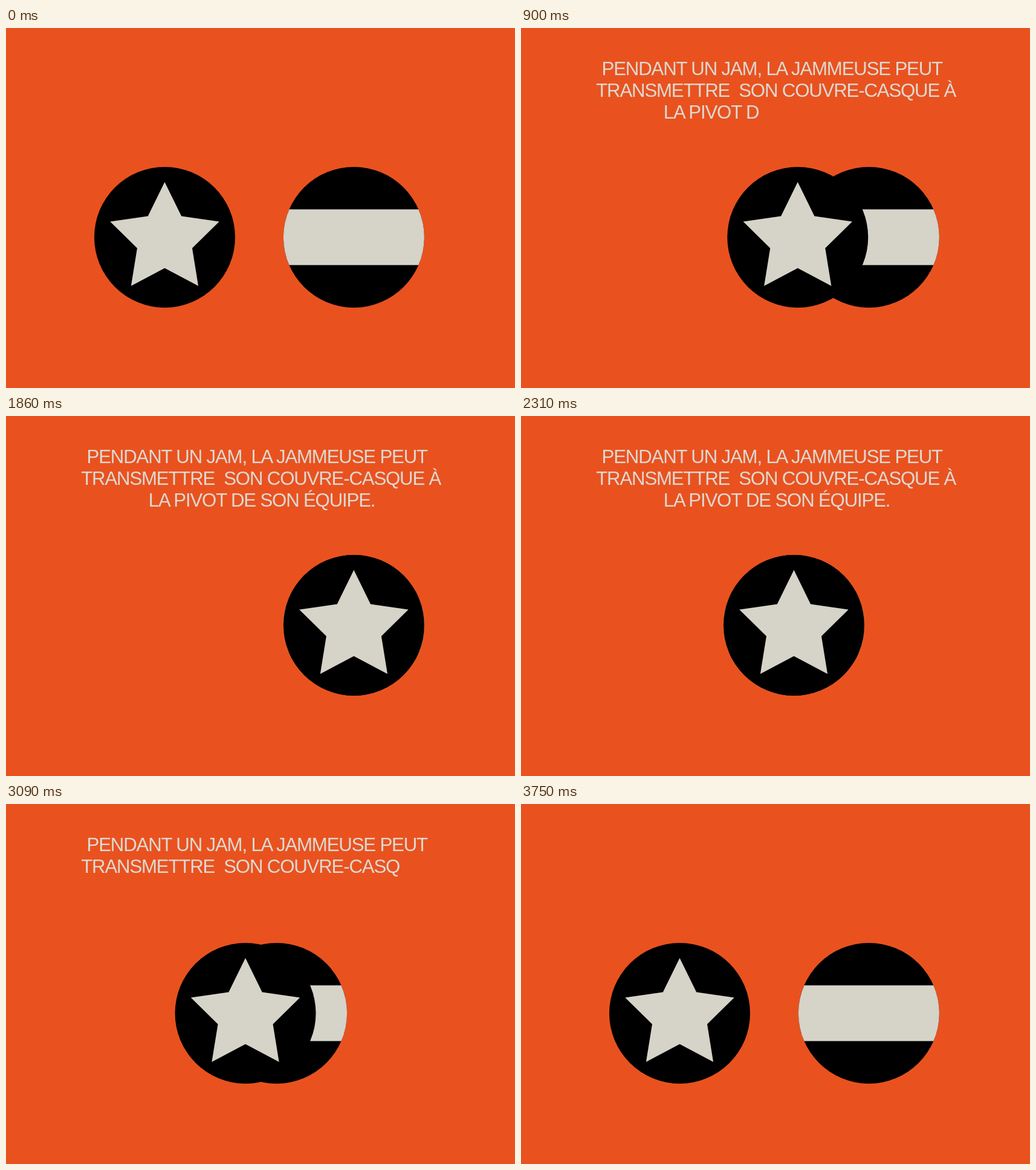
Recreate the animation shown at these times as an HTML page with a canvas. Size 842 by 596 pixels, loop 4.5 s.

```html
<!DOCTYPE html>
<html lang="fr">
<head>
<meta charset="utf-8">
<style>
  html, body { margin: 0; width: 100%; height: 100%; overflow: hidden; background: #e9521f; }
  canvas { display: block; }
</style>
</head>
<body>
<canvas id="stage" width="842" height="596"></canvas>
<script>
const ctx = document.getElementById('stage').getContext('2d');
const STEP = 30, LOOP = 4500;
const ORANGE = '#e9521f', BLACK = '#000', CREAM = '#d6d3c8', INK = '#dedad3';
const CY = 346.4, R = 116.5;
const LEFT = 262.5, MIDDLE = 422.4, RIGHT = 575.4;

const LINES = [
  { text: 'PENDANT UN JAM, LA JAMMEUSE PEUT', x: 133.6, y: 78.4 },
  { text: 'TRANSMETTRE  SON COUVRE-CASQUE À', x: 124.2, y: 114.4 },
  { text: 'LA PIVOT DE SON ÉQUIPE.', x: 235.7, y: 150.4 }
];
const LENGTH = LINES.reduce((sum, line) => sum + line.text.length, 0);

// Right half of the star, from the top tip to the bottom notch
const STAR = [[0, -91.5], [27.7, -35], [90.2, -25.8], [45.5, 18], [55.6, 80.5], [0, 51.2]];

const clamp = v => Math.min(1, Math.max(0, v));
const mix = (a, b, p) => a + (b - a) * p;

// Cubic bezier easing with flat ends: (x1, 0, x2, 1)
function ease(frame, start, end, x1, x2) {
  const x = clamp((frame - start) / (end - start));
  if (x === 0 || x === 1) return x;
  let lo = 0, hi = 1;
  for (let i = 0; i < 30; i++) {
    const s = (lo + hi) / 2, u = 1 - s;
    if (3 * s * u * u * x1 + 3 * s * s * u * x2 + s ** 3 < x) lo = s; else hi = s;
  }
  return lo * lo * (3 - 2 * lo);
}

function disc(x) {
  ctx.beginPath();
  ctx.arc(x, CY, R, 0, 2 * Math.PI);
  ctx.fillStyle = BLACK;
  ctx.fill();
}

function stripedDisc(x) {
  disc(x);
  const half = Math.asin(46.2 / R);
  ctx.beginPath();
  ctx.arc(x, CY, R, -half, half);
  ctx.arc(x, CY, R, Math.PI - half, Math.PI + half);
  ctx.fillStyle = CREAM;
  ctx.fill();
}

function starDisc(x) {
  disc(x);
  ctx.beginPath();
  STAR.forEach(([dx, dy]) => ctx.lineTo(x + dx, CY + dy));
  STAR.slice().reverse().forEach(([dx, dy]) => ctx.lineTo(x - dx, CY + dy));
  ctx.fillStyle = CREAM;
  ctx.fill();
}

function caption(count) {
  ctx.font = '31.2px "Liberation Sans", Arial, sans-serif';
  ctx.letterSpacing = '-1.17px';
  ctx.fontKerning = 'normal';
  ctx.fillStyle = INK;
  for (const { text, x, y } of LINES) {
    if (count > 0) ctx.fillText(text.slice(0, count), x, y);
    count -= text.length;
  }
}

function draw(ms) {
  const frame = Math.floor((ms % LOOP) / STEP);
  const meet = ease(frame, 20, 62, 0.06, 0.05);
  const carry = ease(frame, 62, 93, 0, 0.25);
  const part = ease(frame, 93, 125, 0.6, 0.27);
  const pair = mix(RIGHT, MIDDLE, carry);
  const star = frame < 62 ? mix(LEFT, RIGHT, meet) : mix(pair, LEFT, part);

  ctx.fillStyle = ORANGE;
  ctx.fillRect(0, 0, 842, 596);
  stripedDisc(mix(pair, RIGHT, part));
  starDisc(star);

  const typed = Math.floor(LENGTH * clamp(frame / 35));
  const kept = Math.ceil(LENGTH * clamp((125 - frame) / 32));
  caption(Math.min(typed, kept));
}

const begin = performance.now();
function tick() {
  draw(performance.now() - begin);
  requestAnimationFrame(tick);
}
tick();
</script>
</body>
</html>
```
